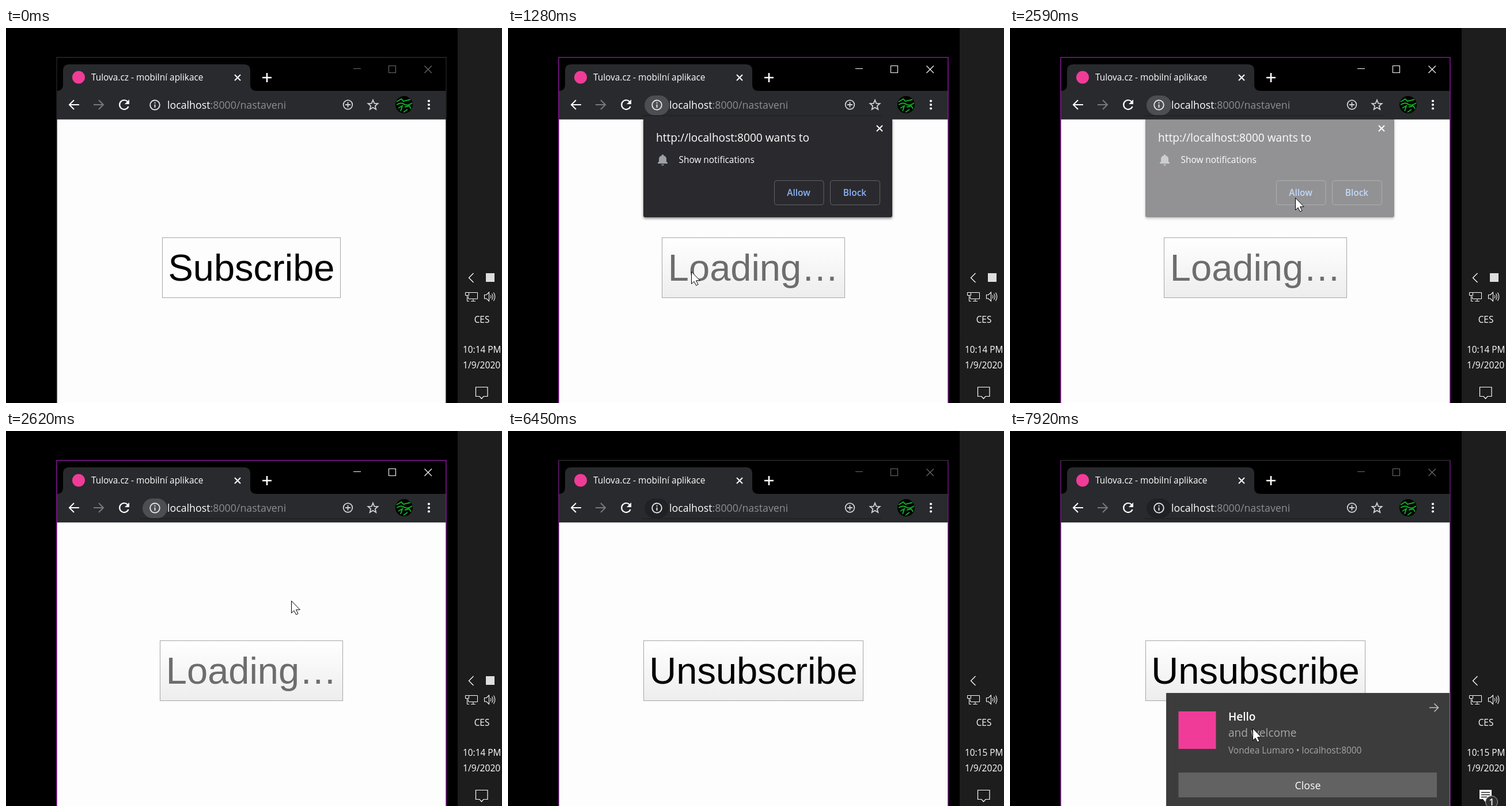
An HTML page for the animation above (7.99 s loop, 861x650 px).

```html
<!DOCTYPE html>
<html lang="en">
<head>
<meta charset="utf-8">
<title>Push notification demo</title>
<style>
html, body { margin: 0; width: 100%; height: 100%; overflow: hidden; background: #000; }
svg { display: block; }
text { font: 15.4px "Open Sans", "Noto Sans", sans-serif; fill: #fff; white-space: pre; }
.mid { text-anchor: middle; }
.line { fill: none; stroke: #fff; }
.action text { font-weight: 600; fill: #8ab4f8; }
.action rect { fill: none; stroke: #5f6368; }
.label { font: 65px "Liberation Sans", Arial, sans-serif; fill: #000; }
.big { font-size: 19.1px; }
</style>
</head>
<body>
<svg width="861" height="650" viewBox="0 0 861 650">
  <defs>
    <linearGradient id="face" x2="0" y2="1">
      <stop stop-color="#fff"/><stop offset="1" stop-color="#ededed"/>
    </linearGradient>
    <filter id="shade" x="-5%" y="-5%" width="110%" height="115%">
      <feDropShadow dx="0" dy="2" stdDeviation="2" flood-opacity=".5"/>
    </filter>
  </defs>
  <rect width="861" height="650"/>

  <!-- browser window -->
  <path fill="#292a2d" d="M88 109Q99 109 99 98V74Q99 63 110 63H413Q424 63 424 74V98Q424 109 435 109H764V159H88Z"/>
  <path stroke="#1b1c1e" d="M88 158H764"/>
  <path fill="#fdfdfd" d="M88 158.5H764V650H88Z"/>
  <path class="line" id="sides" stroke-width="1.5" d="M88 51V650M764 51V650"/>
  <path class="line" id="top" stroke-width="1.5" d="M87.25 51H764.75"/>
  <path class="line" id="controls" stroke-width="1.1" d="M603 70.5H616M664.5 65.5H676.5V77.5H664.5ZM726.5 65.5L739 78M739 65.5L726.5 78"/>
  <circle cx="126" cy="85.5" r="11" fill="#f03c98"/>
  <text x="148" y="91">Tulova.cz - mobilní aplikace</text>
  <path class="line" stroke-width="2" d="M397 81L407 91M407 81L397 91"/>
  <path class="line" stroke-width="2.6" d="M445 86H461M453 78V94"/>

  <!-- toolbar -->
  <path class="line" stroke-width="2" d="M127 133H111M118 125L110 133L118 141"/>
  <path class="line" stroke-width="2" style="stroke:#77797c" d="M152 133H168M161 125L169 133L161 141"/>
  <path class="line" stroke-width="2.2" d="M211 127.5A8 8 0 1 0 212.6 136"/>
  <path fill="#fff" d="M214 124V132H206Z"/>
  <path stroke="#1c1d1f" data-on="1230 7990" d="M232 152H648"/>
  <rect x="237" y="117" width="42" height="34" rx="17" fill="#202124" data-on="2670 7990"/>
  <rect x="237" y="117" width="43" height="34" rx="17" fill="#4c4e52" data-on="1230 2670"/>
  <circle class="line" cx="258.5" cy="133.5" r="8.3" stroke-width="1.9" style="stroke:#e4e4e4"/>
  <path class="line" stroke-width="2" style="stroke:#e4e4e4" d="M258.5 132.5V138M258.5 128.7V130.7"/>
  <text x="280" y="140" style="font-size:17.8px">localhost<tspan fill="#8c8e91">:8000/nastaveni</tspan></text>
  <g class="line" style="stroke:#d0d1d3" stroke-width="1.8">
    <circle cx="593.5" cy="133" r="7.8"/>
    <path d="M589 133H598M593.5 128.5V137.5"/>
    <path id="star"/>
  </g>
  <circle cx="691" cy="133" r="15"/>
  <path class="line" style="stroke:#0fae28" stroke-width="2" d="M678 128L686 123L690 127L702 124M678 133Q686 128 691 132T705 130M681 139L688 135L685 144M692 137L700 135L703 140M690 146L697 141"/>
  <path class="line" stroke-width="4.2" stroke-linecap="round" d="M734 126.5h.01M734 133h.01M734 139.5h.01"/>

  <!-- page button -->
  <rect id="button" y="363.5" height="104"/>
  <text id="label" class="label mid" x="426" y="438"></text>

  <!-- permission prompt -->
  <g id="prompt">
    <path filter="url(#shade)" fill="#292a2d" d="M235 157H667V325Q667 328 664 328H238Q235 328 235 325Z"/>
    <path fill="#292a2d" d="M235 153H667V159H235Z"/>
    <path class="line" stroke-width="2" d="M640 169L650 179M650 169L640 179"/>
    <text class="big" x="257" y="196.5">http://localhost:8000 wants to</text>
    <path fill="#9aa0a6" d="M260 235V233.5L262 231.5V227Q262 222.5 267 221V219.5H270V221Q275 222.5 275 227V231.5L277 233.5V235ZM266 236.5H271Q270.5 238.5 268.5 238.5T266 236.5Z"/>
    <text x="296.5" y="234">Show notifications</text>
    <g class="action mid">
      <rect x="462.5" y="264.5" width="85.5" height="42" rx="4"/><text x="504.5" y="291">Allow</text>
      <rect x="559.5" y="264.5" width="86" height="42" rx="4"/><text x="602" y="291">Block</text>
    </g>
  </g>

  <!-- taskbar -->
  <path fill="#1d1d1d" d="M784 0H861V650H784Z"/>
  <path class="line" stroke-width="1.3" d="M811.5 425L803.5 433L811.5 441"/>
  <rect x="833" y="425" width="15" height="15" fill="#dedede" data-on="0 6450"/>
  <path class="line" d="M804 458.5H818.5V469.5H802.5V465M797.5 458.5H803.5V463.5H797.5ZM800.5 463.5V473.5H804M807 473.5H815M811 469.5V473.5"/>
  <path class="line" d="M830.5 462.5H834L838.5 458V473.5L834 469H830.5ZM841 463Q843 465.5 841 468.5M843.5 460.5Q847 465.5 843.5 471M846.5 458.5Q851 465.5 846.5 473" stroke-width="1.1"/>
  <text class="mid" x="826" y="511">CES</text>
  <text x="793" y="563" id="clock"></text>
  <text x="793" y="589.5" style="font-size:15.7px">1/9/2020</text>
  <path class="line" stroke-width="1.2" data-on="0 6580" d="M815.5 622.5H836V638.5H829L825.5 642.5L822 638.5H815.5Z"/>
  <g data-on="6580 7990">
    <path fill="#fff" d="M815 622H836V638H829L825 643L821 638H815Z"/>
    <path stroke="#1d1d1d" stroke-width="1.3" d="M818 626.5H833M818 630.5H833M818 634.5H828"/>
    <circle cx="836" cy="643" r="10.5" fill="#303030" stroke="#aaa"/>
    <text class="mid" x="836" y="648.5" style="font-weight:600">1</text>
  </g>

  <!-- toast -->
  <g data-on="6780 7990">
    <path fill="#3c3c3c" stroke="#484848" d="M271.5 651V454.5H762.5V651Z"/>
    <path fill="#f03c98" d="M292.5 486H357.5V551H292.5Z"/>
    <text x="379" y="502" style="font-size:19px;font-weight:600">Hello</text>
    <text class="big" x="379" y="529.5" style="fill:#a6a6a6">and welcome</text>
    <text x="379" y="559" style="fill:#a6a6a6">Vondea Lumaro • localhost:8000</text>
    <path fill="#626262" d="M292.5 592H741V635H292.5Z"/>
    <text class="mid" x="517" y="621" style="font-size:17.8px">Close</text>
    <path class="line" stroke-width="1.5" style="stroke:#c4c4c4" data-on="7870 7990" d="M728 479.5H743.5M736.5 472.5L743.5 479.5L736.5 486.5"/>
  </g>

  <path id="cursor" fill="#fff" stroke="#000" d="M.5 .5V21.5L5 17.3L8.6 24.3L12 22.6L8.6 15.8H15.3Z"/>
</svg>
<script>
const LOOP = 7990;
const $ = id => document.getElementById(id);
const set = (id, attrs) => {
  for (const name in attrs) $(id).setAttribute(name, attrs[name]);
};
const timed = [...document.querySelectorAll("[data-on]")].map(el => [el, ...el.dataset.on.split(" ").map(Number)]);

// Pointer keys: time, x, y, steps to the next key
const visits = [
  [[440, 2, 438, 4], [620, 130, 435, 4], [800, 260, 428, 3], [950, 318, 422, 1],
   [1740, 321, 420, 6], [2020, 463, 325, 3], [2170, 529, 303, 3], [2320, 495, 294, 1],
   [3330, 488, 296, 4], [3520, 295, 316, 4], [3715, 26, 321, 1], [3760]],
  [[7600, 11, 6, 2], [7690, 126, 95, 3], [7825, 325, 362, 2], [7920, 421, 515, 1], [LOOP]]
];

function pointer(t) {
  const keys = visits.find(v => t >= v[0][0] && t < v[v.length - 1][0]);
  if (!keys) return null;
  const i = keys.findIndex((k, n) => t < keys[n + 1][0]);
  const [t0, x, y, steps] = keys[i], [t1, x1 = x, y1 = y] = keys[i + 1];
  const u = Math.floor((t - t0) / (t1 - t0) * steps + 1e-6) / steps;
  return [x + (x1 - x) * u, y + (y1 - y) * u];
}

function draw(now) {
  const t = now % LOOP;
  for (const [el, from, to] of timed) el.style.display = t >= from && t < to ? "" : "none";

  const at = pointer(t);
  $("cursor").style.display = at ? "" : "none";
  if (at) set("cursor", { transform: `translate(${at.map(Math.round)})` });

  const active = t >= 1130 && t < 6450;
  $("sides").style.stroke = t < 1130 ? "#202020" : active ? "#881798" : "#6b1b78";
  $("top").style.stroke = active ? "#881798" : "#2c2c2c";
  $("controls").style.stroke = active ? "#fff" : "#6c6c6c";

  const label = t < 1180 ? "Subscribe" : t < 2670 ? "Loading…" : "Unsubscribe";
  const width = { Subscribe: 309, "Loading…": 317, Unsubscribe: 381 }[label];
  const hover = t < 1180 && at && at[0] > 271;
  $("label").textContent = label;
  $("label").style.fill = label == "Loading…" ? "#6d6d6d" : "#000";
  set("button", {
    x: Math.floor(426 - width / 2) + .5, width,
    fill: t < 1130 ? "#fdfdfd" : "url(#face)",
    stroke: hover ? "#707070" : "#a6a6a6"
  });

  $("prompt").style.opacity = t < 1230 || t >= 2620 ? 0 : t < 1280 || t >= 2590 ? .5 : 1;
  $("clock").textContent = t < 6450 ? "10:14 PM" : "10:15 PM";
}

const star = Array.from({ length: 10 }, (_, i) => {
  const r = i % 2 ? 4 : 9, a = i * Math.PI / 5;
  return [637 + r * Math.sin(a), 133.8 - r * Math.cos(a)];
});
set("star", { d: `M${star.join("L")}Z` });

const frame = () => {
  draw(performance.now());
  requestAnimationFrame(frame);
};
frame();
</script>
</body>
</html>
```
